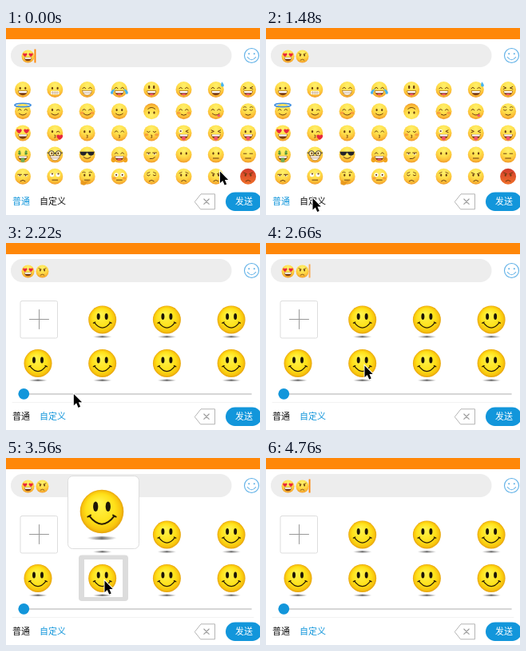
An HTML page with a canvas for the animation above (5060 ms loop, 318 by 234 pixels).

```html
<!DOCTYPE html>
<html lang="zh">
<head>
<meta charset="utf-8">
<title>Emoji keyboard</title>
<style>
html, body { margin: 0; width: 100%; height: 100%; overflow: hidden; background: #fff; }
canvas { display: block; width: 318px; height: 234px; }
</style>
</head>
<body>
<canvas id="stage"></canvas>
<script>
const canvas = document.getElementById('stage');
const ctx = canvas.getContext('2d');
const ratio = window.devicePixelRatio || 1;
canvas.width = 318 * ratio;
canvas.height = 234 * ratio;

const LOOP = 5060;
const BLUE = '#1296db', ORANGE = '#ff8708', BROWN = '#6b3d10', RED = '#e8263d', PINK = '#f0526c', WHITE = '#fff';

// The picture advances in ticks of 140 or 150 ms.
const TICKS = Array.from({ length: 33 }, (_, i) => 150 * i - 10 * Math.min(4, Math.ceil(i / 5)));

const clamp = v => Math.max(0, Math.min(1, v));
const oval = (x, y, rx, ry = rx) =>
  `M${x - rx} ${y}a${rx} ${ry} 0 1 0 ${2 * rx} 0a${rx} ${ry} 0 1 0 ${-2 * rx} 0z`;

function fill(d, color = BROWN) {
  ctx.fillStyle = color;
  ctx.fill(new Path2D(d));
}
function stroke(d, color = BROWN, width = 1) {
  ctx.strokeStyle = color;
  ctx.lineWidth = width;
  ctx.stroke(new Path2D(d));
}
function at(x, y, scale, draw) {
  ctx.save();
  ctx.translate(x, y);
  ctx.scale(scale, scale);
  draw();
  ctx.restore();
}
function mirrored(draw) {
  draw();
  ctx.save();
  ctx.scale(-1, 1);
  draw();
  ctx.restore();
}
function box(x, y, w, h, r, color, border) {
  ctx.beginPath();
  ctx.roundRect(x, y, w, h, r);
  if (color) { ctx.fillStyle = color; ctx.fill(); }
  if (border) { ctx.strokeStyle = border; ctx.lineWidth = 1; ctx.stroke(); }
}
function text(label, x, y, color) {
  ctx.font = '11px "Noto Sans CJK SC", "Noto Sans CJK", sans-serif';
  ctx.textBaseline = 'alphabetic';
  ctx.fillStyle = color;
  ctx.fillText(label, x, y);
}
function gradient(shade, ...stops) {
  stops.forEach(([offset, color]) => shade.addColorStop(offset, color));
  return shade;
}

const heart = (x, y, s) => at(x, y, s, () =>
  fill('M0 3.4C-7 -1 -3 -5.2 0 -2.2C3 -5.2 7 -1 0 3.4z', RED));
function eyeballs(dx, dy, r) {
  for (const x of [-3.8, 3.8]) {
    fill(oval(x, -2, r), WHITE);
    fill(oval(x + dx, -2 + dy, 1.1));
  }
}

// Facial features on a face of radius 10.
const features = {
  dots: () => mirrored(() => fill(oval(3.3, -1.7, 1.15, 1.6))),
  tall: () => mirrored(() => fill(oval(3, -3, 1.2, 2.3))),
  arcs: () => mirrored(() => stroke('M2 -1.2Q3.8 -4.4 5.6 -1.2')),
  closed: () => mirrored(() => stroke('M2 -1.8Q3.8 .3 5.6 -1.8')),
  squint: () => mirrored(() => stroke('M5.8 -3.6L2.4 -2L5.8 -.6')),
  lines: () => mirrored(() => stroke('M2 -1.4H5.6')),
  wink: () => { fill(oval(-3.3, -1.8, 1.15, 1.6)); stroke('M2 -1.3Q4 -3.4 5.8 -1.2'); },
  crazy: () => { fill(oval(-3.8, -2.4, 2.3), WHITE); fill(oval(-3.8, -2.4, 1.1)); stroke('M5.6 -3.6L2.4 -2L5.6 -.8'); },
  hearts: () => mirrored(() => heart(4.6, -2.2, .85)),
  wide: () => eyeballs(0, 0, 2.5),
  roll: () => eyeballs(.4, -1.3, 2.5),
  aside: () => mirrored(() => { fill('M1.8 -2.2H6Q5.6 .2 3.9 .2T1.8 -2.2z', WHITE); fill(oval(3.6, -1.3, .9)); stroke('M1.5 -2.5H6.2'); }),
  money: () => mirrored(() => stroke('M4 -5V.2M5.4 -3.8Q2.6 -4.4 2.8 -3T5.2 -1.6T2.6 -1', '#3c8d3a', 1)),
  glasses: () => mirrored(() => {
    fill(oval(4.3, -1.7, 3.3), '#fff0b0');
    stroke(oval(4.3, -1.7, 3.3) + 'M0 -2H1M7.6 -2.4H9.5', '#3d332a', .9);
    fill(oval(4, -1.7, 1, 1.4));
  }),
  shades: () => mirrored(() => fill('M0 -3.8H9.2L8 0Q5 2.1 2 .2L.8 -2H0z', '#24242a')),
  grin: () => { fill('M-5.8 1.6H5.8Q5.2 7.2 0 7.3Q-5.2 7.2 -5.8 1.6z', '#7a3a12'); fill('M-5.2 1.9H5.2L4.6 4.2H-4.6z', WHITE); },
  laugh: () => { features.grin(); fill(oval(0, 6.1, 2.8, 1.1), PINK); },
  beam: () => { fill('M-6 1.5H6Q5 7 0 7.1Q-5 7 -6 1.5z', WHITE); stroke('M-6 1.5H6Q5 7 0 7.1Q-5 7 -6 1.5zM-5.2 4.1H5.2', '#9a6429', .6); },
  teeth: () => { box(-5.5, 1.8, 11, 4.5, 2, WHITE); stroke('M-5.1 4H5.1M-2.6 1.9V6.1M0 1.9V6.1M2.6 1.9V6.1', '#a9783f', .5); },
  smile: () => stroke('M-4.4 2.9Q0 6.9 4.4 2.9'),
  soft: () => stroke('M-3.2 4Q0 6.2 3.2 4'),
  smirk: () => stroke('M-2 5Q2 5.8 4.2 3.2'),
  frown: () => stroke('M-3 5.8Q0 3.1 3 5.8'),
  flat: () => stroke('M-3.4 4.4H3.4'),
  kiss: () => stroke('M-.6 2.6Q2 2.6 .2 4.2Q2 5.8 -.6 5.8', BROWN, .9),
  tongue: () => { features.grin(); box(-2.3, 4, 4.6, 5.2, 2.2, PINK); },
  cash: () => { features.grin(); box(-2.3, 4, 4.6, 5.2, .6, '#6fae58'); },
  yum: () => { features.smile(); fill(oval(3.6, 5.2, 2, 1.5), PINK); },
  blush: () => mirrored(() => fill(oval(6.2, 2, 2.4, 1.6), 'rgba(240,90,50,.4)')),
  brows: () => mirrored(() => stroke('M2.2 -5Q4.2 -6.6 6 -5', BROWN, .8)),
  sad: () => mirrored(() => stroke('M2.4 -5.4L5.6 -4', BROWN, .8)),
  angry: () => mirrored(() => stroke('M1.6 -3.2L5.6 -4.8')),
  tears: () => mirrored(() => fill('M5 -.5Q10 -.5 11 4Q10.5 6.8 8 5.2Q7.8 2 5 -.5z', '#46b2ee')),
  sweat: () => fill('M7.5 -9.8Q12 -4.2 8.5 -3.4Q4.6 -3.6 7.5 -9.8z', '#48b4f0'),
  halo: () => stroke(oval(0, -7.8, 10.2, 2.2), '#3f8ee0', 1.6),
  love: () => heart(6, 5.2, 1),
  hand: () => fill('M-8 9.8Q-9 4 -5.8 4.7L-4 6.4L2.6 4.6Q4.3 5.2 2 6.8L-1 8Q-1 11 -4.6 11z', '#e99a1e'),
  hug: () => mirrored(() => { fill(oval(7.4, 6.2, 3, 3.4), '#f3a51f'); stroke('M5.7 4L6.7 6M7.7 3.2V5.8', '#c98318', .6); }),
};

const EMOJI = [
  'dots grin|dots teeth|arcs beam|arcs laugh tears|tall laugh|arcs laugh|arcs grin sweat|squint laugh',
  'arcs smile halo|wink smile|arcs smile blush|dots smile|dots smile flip|arcs soft blush|arcs yum|closed soft brows',
  'hearts grin|wink kiss love|dots kiss|arcs kiss|closed kiss blush|crazy tongue|squint tongue|dots tongue',
  'money cash|glasses beam|shades smile|arcs laugh hug|aside smirk|dots|dots flat|lines flat',
  'aside frown|roll flat|dots flat hand brows|wide flat blush|closed frown sad|dots frown sad|dots frown angry|dots frown angry red',
].map(row => row.split('|'));
const LOVE = EMOJI[2][0], ANGRY = EMOJI[4][6];

function emoji(x, y, radius, spec) {
  at(x, y, radius / 10, () => {
    const tokens = spec.split(' ');
    const shade = tokens.includes('red')
      ? gradient(ctx.createLinearGradient(0, -10, 0, 10), [0, '#d03a2c'], [1, '#f0702a'])
      : gradient(ctx.createRadialGradient(0, -5, 0, 0, -5, 15.5),
          [0, '#fff06c'], [.45, '#ffdf4b'], [.75, '#fcc038'], [1, '#ee9428']);
    if (tokens.includes('flip')) ctx.rotate(Math.PI);
    fill(oval(0, 0, 10), shade);
    for (const name of tokens) features[name]?.();
  });
}

function smiley(x, y, radius) {
  at(x, y, radius / 17.5, () => {
    fill(oval(0, 21.3, 12, 1.3), gradient(ctx.createLinearGradient(-12, 0, 12, 0),
      [0, 'rgba(90,90,90,0)'], [.5, 'rgba(90,90,90,.8)'], [1, 'rgba(90,90,90,0)']));
    fill(oval(0, 0, 17.5), gradient(ctx.createRadialGradient(-3, -7, 1, 0, 0, 17.5),
      [0, '#fff44e'], [.65, '#ffe018'], [.88, '#f8c50e'], [1, '#e6a30c']));
    mirrored(() => fill(oval(5, -4, 2, 4), '#1d1606'));
    stroke('M-10 3.6Q0 16.5 10 3.6M-11.3 4.2L-9 3M11.3 4.2L9 3', '#2a1c05', 1.3);
  });
}

function drawEmojiPage(pressed) {
  EMOJI.forEach((row, j) => row.forEach((spec, i) => {
    if (pressed && spec === ANGRY) box(249, 173, 29, 25, 3, '#dcdcdc');
    emoji(21 + 40.3 * i, 77 + 27.2 * j, 10, spec);
  }));
  if (pressed) {
    box(244.5, 120.5, 38, 46, 4, WHITE, '#ddd');
    emoji(263.5, 143, 14, ANGRY);
  }
}

function drawCustomPage(pressed) {
  box(18, 72.5, 46.5, 46.5, 2, WHITE, '#ddd');
  stroke('M29.5 95.5H53.5M41.5 83.5V107.5', '#999');
  if (pressed) {
    box(91, 121.5, 62, 57.5, 4, '#dcdcdc');
    box(98, 127, 48, 47, 0, WHITE);
  }
  for (let i = 1; i < 8; i++) smiley(40 + 80.7 * (i % 4), i < 4 ? 96 : 150.5, 17.5);
  if (pressed) {
    box(77.5, 22.5, 89, 91, 6, WHITE, '#ddd');
    smiley(120, 67, 27.3);
  }
  stroke('M16 189H307', '#c9c9c9', 1.6);
  fill(oval(22.3, 188.8, 6.9), BLUE);
  stroke('M8 199.5H310', '#f2f2f2');
}

function drawInput(t) {
  box(6, 20, 276.5, 29, 14.5, '#ededed');
  emoji(27.5, 35.5, 8, LOVE);
  if (t >= 440) emoji(45.5, 35.5, 8, ANGRY);
  const phase = t % 1000;
  ctx.globalAlpha = t < 1200 || phase < 200 ? 1 : clamp((phase - 600) / 90);
  box(t < 440 ? 35.5 : 53.6, 26.5, 1.9, 17, 0, ORANGE);
  ctx.globalAlpha = 1;
  stroke(oval(307.5, 34.5, 9), '#5aaee6', 1.1);
  stroke('M302.3 36.5Q307.5 43 312.7 36.5', '#5aaee6', 1.1);
  fill(oval(304.2, 32.3, 1) + oval(310.8, 32.3, 1), '#5aaee6');
}

function drawToolbar(t) {
  text('普通', 8, 221, t < 1620 ? BLUE : '#111');
  text('自定义', 42, 221, t < 1770 ? '#111' : BLUE);
  stroke('M236.5 217.3L244 207.8H261.5V226.8H244z', '#b4b4b4');
  stroke('M247.8 214L254.2 220.4M254.2 214L247.8 220.4', '#999', 1.1);
  box(275, 205.5, 45, 23.5, 11.75, BLUE);
  text('发送', 287, 221, WHITE);
}

// Pointer stops: time, x, y.
const POINTER = [
  [0, 268, 179.5], [440, 268, 179.5], [740, 220.5, 179.5], [1480, 58.5, 213], [1920, 58.5, 213],
  [2660, 123.5, 153.5], [3860, 123.5, 153.5], [4740, 215, 238], [LOOP, 215, 238],
];
function drawPointer(t) {
  const next = POINTER.findIndex(stop => stop[0] > t);
  const [t0, x0, y0] = POINTER[next - 1], [t1, x1, y1] = POINTER[next];
  const k = (t - t0) / (t1 - t0);
  at(x0 + (x1 - x0) * k, y0 + (y1 - y0) * k, 1, () => {
    const arrow = 'M0 0V14.4L3.3 11.4L5.7 17L8.2 15.9L5.9 10.4H10.2z';
    stroke(arrow, WHITE, 1.8);
    fill(arrow, '#000');
  });
}

function render(now) {
  const elapsed = now % LOOP;
  const t = TICKS.findLast(tick => tick <= elapsed) ?? 0;
  const during = (from, to) => t >= from && t < to;
  ctx.setTransform(ratio, 0, 0, ratio, 0, 0);
  ctx.lineCap = 'round';
  box(0, 0, 318, 234, 0, WHITE);
  box(0, 0, 318, 14, 0, ORANGE);
  drawInput(t);
  if (t < 1620) drawEmojiPage(during(140, 440));
  else drawCustomPage(during(2960, 3110) || during(3560, 3710));
  drawToolbar(t);
  drawPointer(t);
}

const start = performance.now();
function loop() {
  render(performance.now() - start);
  requestAnimationFrame(loop);
}
loop();
</script>
</body>
</html>
```
